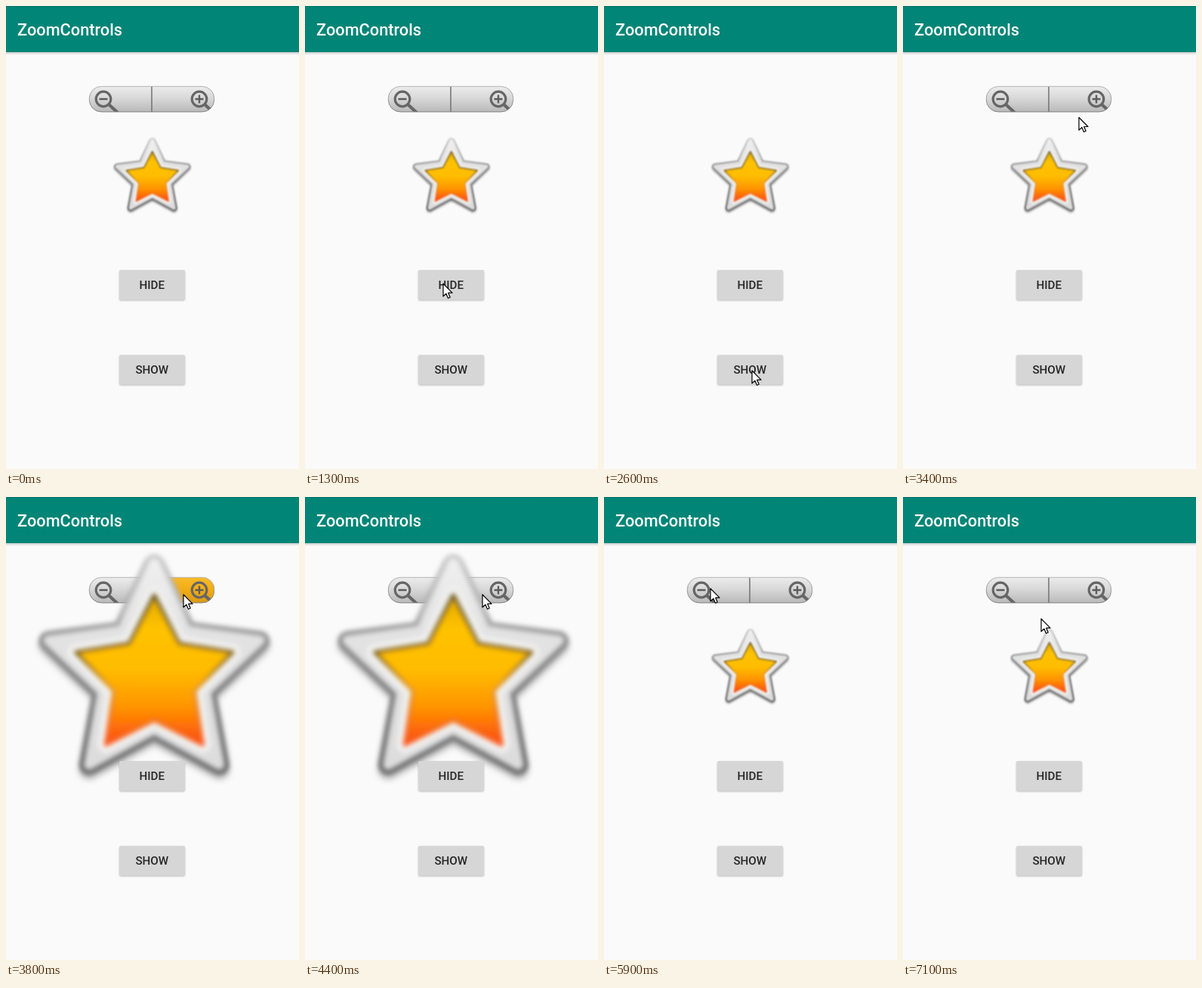
Recreate the animation shown at these times as an HTML page. Size 388 px wide and 612 px high, loop 7200 ms.

```html
<!DOCTYPE html>
<html lang="en">
<head>
<meta charset="utf-8">
<title>ZoomControls</title>
<style>
  html, body { margin: 0; width: 100%; height: 100%; overflow: hidden; background: #fafafa; }
  svg { display: block; width: 388px; height: 612px; }
  text { font-family: Roboto, "Noto Sans", sans-serif; font-weight: 500; }
  .label { font-size: 15.2px; fill: #262626; text-anchor: middle; }
  .glass { fill: none; stroke: #666; stroke-width: 3.2; }
  .handle { fill: none; stroke: #666; stroke-width: 4.2; }
  .sign { fill: none; stroke: #5c5c5c; stroke-width: 2.4; }
</style>
</head>
<body>
<svg viewBox="0 0 388 612">
  <defs>
    <linearGradient id="bar" x2="0" y2="1">
      <stop stop-color="#00766a"/><stop offset=".04" stop-color="#008577"/>
    </linearGradient>
    <linearGradient id="barShadow" x2="0" y2="1">
      <stop stop-color="#000" stop-opacity=".18"/><stop offset="1" stop-color="#000" stop-opacity="0"/>
    </linearGradient>
    <linearGradient id="metal" x2="0" y2="1">
      <stop stop-color="#ececec"/><stop offset=".45" stop-color="#d9d9d9"/><stop offset="1" stop-color="#b9b9b9"/>
    </linearGradient>
    <linearGradient id="metalEdge" x2="0" y2="1">
      <stop stop-color="#b5b5b5"/><stop offset="1" stop-color="#828282"/>
    </linearGradient>
    <linearGradient id="pressed" x2="0" y2="1">
      <stop stop-color="#f8bb2a"/><stop offset=".5" stop-color="#f2ac12"/><stop offset="1" stop-color="#d99a18"/>
    </linearGradient>
    <linearGradient id="rim" gradientUnits="userSpaceOnUse" x1="0" y1="72" x2="0" y2="370">
      <stop stop-color="#d2d2d2"/><stop offset=".27" stop-color="#b8b8b8"/>
      <stop offset=".42" stop-color="#8a8a8a"/><stop offset="1" stop-color="#686868"/>
    </linearGradient>
    <linearGradient id="ring" gradientUnits="userSpaceOnUse" x1="0" y1="72" x2="0" y2="370">
      <stop stop-color="#f1f1f1"/><stop offset=".35" stop-color="#e2e2e2"/><stop offset="1" stop-color="#dcdcdc"/>
    </linearGradient>
    <linearGradient id="gold" gradientUnits="userSpaceOnUse" x1="0" y1="130" x2="0" y2="327">
      <stop stop-color="#e0a800"/><stop offset=".22" stop-color="#ffc200"/><stop offset=".5" stop-color="#ffbc00"/>
      <stop offset=".75" stop-color="#ff9400"/><stop offset="1" stop-color="#fb4a10"/>
    </linearGradient>
    <linearGradient id="goldEdge" gradientUnits="userSpaceOnUse" x1="0" y1="130" x2="0" y2="327">
      <stop stop-color="#6e5a20"/><stop offset=".4" stop-color="#8a681c"/>
      <stop offset=".6" stop-color="#e39a20"/><stop offset="1" stop-color="#fb5a20"/>
    </linearGradient>
    <filter id="soft" x="-10%" y="-10%" width="120%" height="120%"><feGaussianBlur stdDeviation="3.2"/></filter>
    <filter id="shade" x="-15%" y="-15%" width="130%" height="130%"><feGaussianBlur stdDeviation="5"/></filter>
    <filter id="drop" x="-10%" y="-20%" width="120%" height="150%"><feGaussianBlur stdDeviation="1.1"/></filter>
    <clipPath id="pill"><rect x="110" y="106" width="166" height="34" rx="16"/></clipPath>
    <path id="outer"/>
    <path id="inner"/>
    <g id="lens">
      <path class="handle" d="M7 7 19 18"/>
      <circle class="glass" r="9.8"/>
    </g>
  </defs>

  <rect width="388" height="612" fill="#fafafa"/>
  <rect y="61" width="388" height="4" fill="url(#barShadow)"/>
  <rect width="388" height="61" fill="url(#bar)"/>
  <text x="15" y="39.4" font-size="21.75" fill="#fff">ZoomControls</text>

  <g id="controls">
    <g clip-path="url(#pill)">
      <rect x="110" y="106" width="166" height="34" fill="url(#metal)"/>
      <rect id="minusDown" x="110" y="106" width="83" height="34" fill="url(#pressed)"/>
      <rect id="plusDown" x="193" y="106" width="83" height="34" fill="url(#pressed)"/>
      <use href="#lens" x="129" y="123"/>
      <use href="#lens" x="256" y="123"/>
      <path class="sign" d="M123.5 123h11M250.5 123h11M256 117.5v11"/>
      <path d="M193 106v34" stroke="#777" stroke-width="1.6"/>
    </g>
    <rect x="110.3" y="106.3" width="165.4" height="33.6" rx="16" fill="none" stroke="url(#metalEdge)"/>
  </g>

  <g id="star" stroke-linejoin="round">
    <use href="#outer" y="6" fill="#777" stroke="#777" stroke-width="25" opacity=".6" filter="url(#shade)"/>
    <use href="#outer" fill="url(#rim)" stroke="url(#rim)" stroke-width="25" filter="url(#soft)"/>
    <g filter="url(#soft)">
      <use href="#outer" fill="url(#ring)" stroke="url(#ring)" stroke-width="13"/>
      <use href="#inner" fill="none" stroke="#f0f0f0" stroke-width="22"/>
    </g>
    <use href="#inner" fill="url(#gold)" stroke="url(#goldEdge)" stroke-width="5" filter="url(#soft)"/>
  </g>

  <g id="buttons"></g>
  <path id="cursor" d="M0 0V16.8L3.9 13.2 6.5 19.2 9.2 18 6.7 12.2H12Z" fill="#fff" stroke="#000" stroke-width="1.2" stroke-linejoin="round"/>
</svg>
<script>
const LOOP = 7200, STEP = 100;
const $ = id => document.getElementById(id);

const spots = {
  corner: [374, 589], hide: [183, 367], show: [196, 482],
  plus: [235, 129], minus: [141, 121], rest: [183, 161]
};
const hops = [
  { from: "corner", to: "hide", start: 100, end: 900 },
  { from: "hide", to: "show", start: 1900, end: 2400 },
  { from: "show", to: "plus", start: 2900, end: 3480 },
  { from: "plus", to: "minus", start: 4400, end: 5000 },
  { from: "minus", to: "rest", start: 6100, end: 6700 }
];
const press = { hide: 1500, show: 2700, plus: 3600, minus: 5200 };

const progress = (t, start, end) => Math.min(1, Math.max(0, (t - start) / (end - start)));
const smooth = p => p * p * (3 - 2 * p);
const ripple = (t, start) => .12 * Math.sin(Math.PI * progress(t, start - 100, start + 400));
const during = (t, start, length) => t >= start && t < start + length ? 1 : 0;
// Two steps of zoom follow each press
const clicks = (t, start) => Math.min(2, Math.max(0, Math.floor((t - start) / STEP)));

function pointer(t) {
  const hop = hops.findLast(h => t >= h.start) ?? hops[0];
  const p = smooth(progress(t, hop.start, hop.end));
  const goal = spots[hop.to];
  return spots[hop.from].map((v, i) => v + (goal[i] - v) * p);
}

function starPath(cx, cy, tip, notch) {
  const points = Array.from({ length: 10 }, (_, i) => {
    const r = i % 2 ? notch : tip, a = i * Math.PI / 5;
    return [cx + r * Math.sin(a), cy - r * Math.cos(a)];
  });
  return `M${points.join("L")}Z`;
}

function button(label, y) {
  const box = (dy, attrs) => `<rect x="150" y="${y + dy}" width="87" height="39.4" rx="2" ${attrs}/>`;
  return box(1, 'fill="#000" opacity=".24" filter="url(#drop)"') + box(0, 'fill="#d6d6d7"') +
    box(0, `id="${label}"`) +
    `<text class="label" x="193.3" y="${y + 25.2}">${label}</text>`;
}

const set = (id, name, value) => $(id).setAttribute(name, value);
set("outer", "d", starPath(196.3, 235, 147, 72));
set("inner", "d", starPath(196.3, 239, 109, 56));
$("buttons").innerHTML = button("HIDE", 349) + button("SHOW", 461.2);

function draw(now) {
  const t = Math.floor(now % LOOP / STEP) * STEP;
  const zoom = 1 + clicks(t, press.plus) - clicks(t, press.minus);
  set("cursor", "opacity", t >= hops[0].start ? 1 : 0);
  set("cursor", "transform", `translate(${pointer(t)})`);
  set("controls", "opacity",
    1 - progress(t, press.hide, press.hide + 500) + progress(t, press.show, press.show + 500));
  set("HIDE", "opacity", ripple(t, press.hide));
  set("SHOW", "opacity", ripple(t, press.show));
  set("plusDown", "opacity", during(t, press.plus, 300));
  set("minusDown", "opacity", during(t, press.minus, 200));
  set("star", "transform", `translate(192.5 223.5) scale(${zoom / 3}) translate(-192.5 -223.5)`);
}

let start;
function tick(now) {
  start ??= now;
  draw(now - start);
  requestAnimationFrame(tick);
}
draw(0);
requestAnimationFrame(tick);
</script>
</body>
</html>
```
